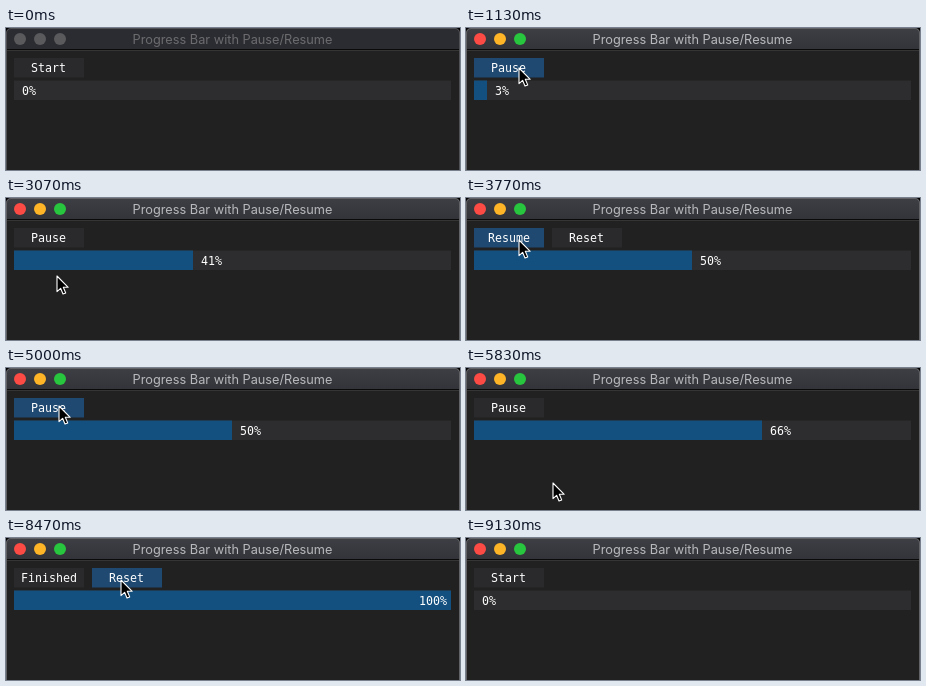
An HTML page for the animation above (9260 ms loop, 454 by 142 pixels).

```html
<!DOCTYPE html>
<html lang="en">
<head>
<meta charset="utf-8">
<title>Progress Bar with Pause/Resume</title>
<style>
  html, body { margin: 0; width: 100%; height: 100%; overflow: hidden; background: #000; }
  svg { display: block; width: 454px; height: 142px; }
  .ui { font: 11.63px "DejaVu Sans Mono", monospace; fill: #fff; white-space: pre; }
  .title { font: 12.75px Inter, sans-serif; text-anchor: middle; }
</style>
</head>
<body>
<svg viewBox="0 0 454 142">
  <defs>
    <linearGradient id="chrome" x2="0" y2="1">
      <stop stop-color="#3e3f44"/>
      <stop offset="1" stop-color="#333439"/>
    </linearGradient>
    <clipPath id="frame"><rect width="454" height="160" rx="5"/></clipPath>
  </defs>
  <g clip-path="url(#frame)">
    <rect width="454" height="142" fill="#212121"/>
    <rect id="bar" width="454" height="21"/>
    <rect y="21" width="454" height="1" fill="#0a0a0a"/>
    <rect y="22" width="454" height="1" fill="#353535"/>
  </g>
  <rect id="edge" x=".5" y=".5" width="453" height="160" rx="4.5" fill="none"/>
  <circle class="light" cx="14" cy="11" r="6"/>
  <circle class="light" cx="34" cy="11" r="6"/>
  <circle class="light" cx="54" cy="11" r="6"/>
  <text id="title" class="title" x="226.5" y="16">Progress Bar with Pause/Resume</text>

  <rect id="main" x="8" y="30" width="70" height="19.5"/>
  <text id="label" class="ui" y="44"></text>
  <g id="reset">
    <rect id="resetBox" x="86" y="30" width="70" height="19.5"/>
    <text class="ui" x="103" y="44">Reset</text>
  </g>

  <rect x="8" y="52.5" width="437" height="19.5" fill="#2d2d2f"/>
  <rect id="fill" x="8" y="52.5" height="19.5" fill="#14507f"/>
  <text id="percent" class="ui" y="67"></text>

  <path id="cursor" d="M0 0V15.6L3.6 12.3L6 18L8.7 16.9L6.3 11.3H11.2Z"
        fill="#000" stroke="#fff" stroke-width="1.1" stroke-linejoin="round"/>
</svg>
<script>
const LOOP = 9260;
const ACTIVATE = 760, START = 965, PAUSE = 3530, RESUME = 4970, DONE = 7700, RESET = 8520;
const FACE = '#2a2a2d', HOVER = '#1f4970';
const LIGHTS = ['#fc4b44', '#fdb427', '#28c63e'];

// Pointer stops: time, x, y
const STOPS = [
  [370, -14, 36], [720, 53, 40], [1300, 53, 40], [1900, 97, 112],
  [2720, 97, 112], [3080, 51, 78], [3270, 53, 42], [3790, 53, 42],
  [4000, 68, 94], [4270, 68, 94], [4700, 53, 38], [5200, 53, 38],
  [5740, 87, 115], [8000, 87, 115], [8380, 115, 42], [8590, 115, 42],
  [8900, 98, 101], [8930, 98, 101], [9130, -14, 77]
];

const el = id => document.getElementById(id);
const set = (node, attrs) => {
  for (const key in attrs) node.setAttribute(key, attrs[key]);
};
const ease = k => k * k * (3 - 2 * k);

function pointer(t) {
  const i = STOPS.findIndex(s => s[0] > t);
  if (i < 0) return STOPS[STOPS.length - 1].slice(1);
  if (i === 0) return STOPS[0].slice(1);
  const [t0, x0, y0] = STOPS[i - 1], [t1, x1, y1] = STOPS[i];
  const k = ease((t - t0) / (t1 - t0));
  return [x0 + (x1 - x0) * k, y0 + (y1 - y0) * k];
}

function progress(t) {
  if (t < START || t >= RESET) return 0;
  if (t < RESUME) return Math.min(50, Math.floor((t - START) / 51));
  return Math.min(100, 50 + Math.max(0, Math.floor((t - 4980) / 52.4)));
}

function caption(t) {
  if (t < START || t >= RESET) return 'Start';
  if (t >= DONE) return 'Finished';
  return t >= PAUSE && t < RESUME ? 'Resume' : 'Pause';
}

function draw(t) {
  const active = t >= ACTIVATE;
  set(el('bar'), { fill: active ? 'url(#chrome)' : '#2b2c31' });
  set(el('edge'), { stroke: active ? '#626367' : '#505155' });
  set(el('title'), { fill: active ? '#b8b9bc' : '#6c6c6f' });
  document.querySelectorAll('.light').forEach((c, i) =>
    set(c, { fill: active ? LIGHTS[i] : '#5a5a5d' }));

  const [x, y] = pointer(t).map(Math.round);
  set(el('cursor'), { transform: `translate(${x} ${y})` });
  const over = left => active && x >= left && x < left + 70 && y >= 30 && y < 49;

  const text = caption(t);
  el('label').textContent = text;
  set(el('label'), { x: Math.floor(43 - text.length * 3.5) });
  set(el('main'), { fill: over(8) && text !== 'Finished' ? HOVER : FACE });

  const canReset = text === 'Resume' || text === 'Finished';
  set(el('reset'), { visibility: canReset ? 'visible' : 'hidden' });
  set(el('resetBox'), { fill: over(86) ? HOVER : FACE });

  const p = progress(t), width = 4.37 * p, note = p + '%';
  set(el('fill'), { width: Math.floor(width) });
  el('percent').textContent = note;
  set(el('percent'), { x: Math.min(Math.floor(16 + width), 441 - note.length * 7) });
}

const begin = performance.now();
function tick() {
  draw((performance.now() - begin) % LOOP);
  requestAnimationFrame(tick);
}
tick();
</script>
</body>
</html>
```
